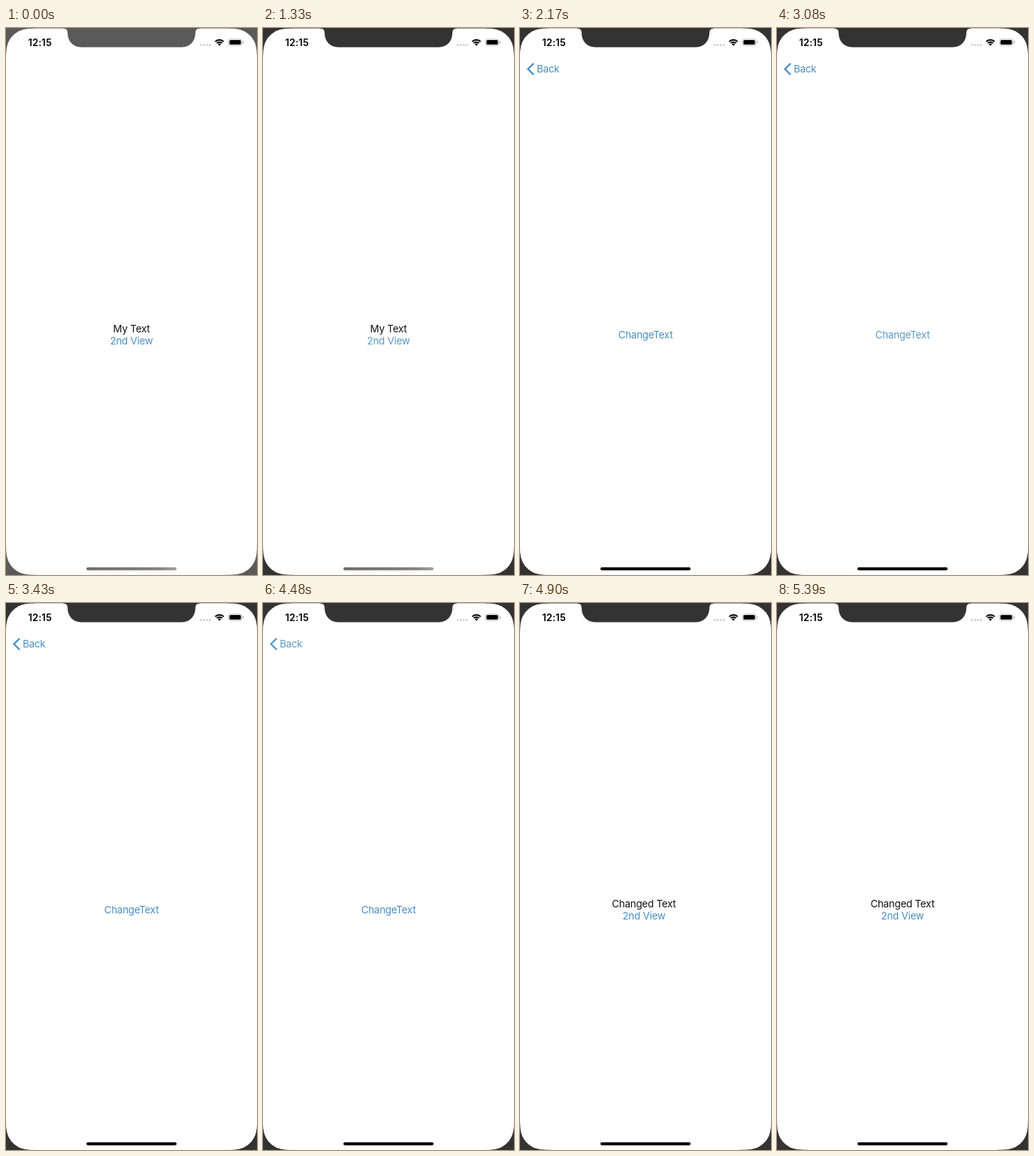
An HTML page with a canvas for the animation above (5600 ms loop, 334x726 px).

```html
<!DOCTYPE html>
<html lang="en">
<head>
<meta charset="utf-8">
<title>Navigation demo</title>
<style>
  html, body { margin: 0; width: 100%; height: 100%; overflow: hidden; background: #333; }
  canvas { display: block; width: 334px; height: 726px; }
</style>
</head>
<body>
<canvas id="stage"></canvas>
<script>
const W = 334, H = 726, LOOP = 5600, STEP = 70;
const TINT = '#4a8ebf', INK = '#111';
const PUSH_AT = 1442, POP_AT = 4568, TAP_AT = 3080, SPRING = 0.0174;

const canvas = document.getElementById('stage');
const ctx = canvas.getContext('2d');
const dpr = window.devicePixelRatio || 1;
canvas.width = W * dpr;
canvas.height = H * dpr;

const clamp = v => Math.max(0, Math.min(1, v));
const fadeIn = p => clamp((p - 0.4) / 0.45);

// Critically damped spring from 0 to 1
function spring(ms) {
  const x = Math.max(0, ms) * SPRING;
  return x > 9.2 ? 1 : 1 - (1 + x) * Math.exp(-x);
}

// Opacity dip of a pressed button
function press(t, at) {
  const u = (t - at + 50) / 400;
  return t < at || u >= 1 ? 1 : 1 - 0.65 * Math.sin(Math.PI * u) ** 2;
}

function text(str, x, y, color, align = 'center', font = '400 13.3px', spacing = -0.2) {
  ctx.font = font + ' Inter, "Liberation Sans", sans-serif';
  ctx.letterSpacing = spacing + 'px';
  ctx.textAlign = align;
  ctx.fillStyle = color;
  ctx.fillText(str, x, y);
}

function pill(x, y, w, h, r, color) {
  ctx.beginPath();
  ctx.roundRect(x, y, w, h, r);
  ctx.fillStyle = color;
  ctx.fill();
}

// Rounded screen outline with continuous-curvature corners
function screenPath(r) {
  const top = 0.6;
  const corner = (x, y, sx, sy, flip) => {
    const at = (a, b) => flip ? [x + sx * b * r, y + sy * a * r] : [x + sx * a * r, y + sy * b * r];
    ctx.lineTo(...at(1.529, 0));
    ctx.bezierCurveTo(...at(1.088, 0), ...at(0.868, 0), ...at(0.631, 0.075));
    ctx.bezierCurveTo(...at(0.373, 0.169), ...at(0.169, 0.373), ...at(0.075, 0.631));
    ctx.bezierCurveTo(...at(0, 0.868), ...at(0, 1.088), ...at(0, 1.529));
  };
  ctx.beginPath();
  corner(0, top, 1, 1, false);
  corner(0, H, 1, -1, true);
  corner(W, H, -1, -1, false);
  corner(W, top, -1, 1, true);
  ctx.closePath();
}

function rootView(t, p) {
  const x = W / 2 - 0.3 * W * p;
  text(t < TAP_AT ? 'My Text' : 'Changed Text', x, 404, INK);
  ctx.globalAlpha = press(t, 1330);
  text('2nd View', x, 420, TINT);
  ctx.globalAlpha = 1;
  ctx.fillStyle = `rgba(0,0,0,${0.064 * fadeIn(p)})`;
  ctx.fillRect(0, 0, W, H);
}

function detailView(t, p) {
  const x = W * (1 - p);
  ctx.fillStyle = '#fff';
  ctx.fillRect(x, 0, W, H);
  ctx.globalAlpha = press(t, TAP_AT);
  text('ChangeText', x + W / 2, 412, TINT);
  ctx.globalAlpha = 1;
}

// The label shrinks from large-title size into the bar
function backButton(t, p) {
  const r = 1 - p, dim = press(t, 4480);
  ctx.save();
  ctx.translate(22.2 - 10 * r, 54.5 + 43 * r);
  ctx.save();
  ctx.scale(1 + r, 1 + r);
  ctx.globalAlpha = dim * fadeIn(p);
  text('Back', 0, 4.8, TINT, 'left');
  ctx.restore();
  ctx.translate(80 * r, 0);
  ctx.globalAlpha = dim * clamp((p - 0.89) / 0.11);
  ctx.beginPath();
  ctx.moveTo(-4, -7.5);
  ctx.lineTo(-11.6, 0);
  ctx.lineTo(-4, 7.5);
  ctx.strokeStyle = TINT;
  ctx.lineWidth = 2.3;
  ctx.stroke();
  ctx.restore();
}

function wifi(x, y) {
  const a = Math.PI * 1.25, b = Math.PI * 1.75;
  ctx.strokeStyle = ctx.fillStyle = '#000';
  ctx.lineWidth = 1.9;
  for (const r of [8, 5.1]) {
    ctx.beginPath();
    ctx.arc(x, y, r, a, b);
    ctx.stroke();
  }
  ctx.beginPath();
  ctx.moveTo(x, y);
  ctx.arc(x, y, 3.1, a, b);
  ctx.fill();
}

function statusBar() {
  text('12:15', 45.2, 24, '#000', 'center', '600 12.9px', 0.1);
  for (let i = 0; i < 4; i++) pill(258 + i * 4, 21.2, 2.5, 2.5, 1.25, '#c6c6c6');
  wifi(284, 23.8);
  ctx.beginPath();
  ctx.roundRect(296.1, 14.9, 17.8, 8.4, 2.6);
  ctx.strokeStyle = '#a6a6a6';
  ctx.lineWidth = 0.8;
  ctx.stroke();
  pill(297.4, 16.1, 15.2, 6, 1.5, '#000');
  pill(315.1, 17.6, 1.1, 3, 0.6, '#a6a6a6');
}

function notch(color) {
  const bottom = 25.4;
  ctx.beginPath();
  ctx.moveTo(76, 0);
  ctx.lineTo(76, 0.6);
  ctx.quadraticCurveTo(82, 0.8, 82, 6.5);
  ctx.bezierCurveTo(82, 17.5, 89, bottom, 100, bottom);
  ctx.lineTo(234, bottom);
  ctx.bezierCurveTo(245, bottom, 252, 17.5, 252, 6.5);
  ctx.quadraticCurveTo(252, 0.8, 258, 0.6);
  ctx.lineTo(258, 0);
  ctx.fillStyle = color;
  ctx.fill();
}

function homeBar(t) {
  let color = '#000';
  if (t < 1400) {
    color = ctx.createLinearGradient(107, 0, 227, 0);
    color.addColorStop(0, '#6c6c6c');
    color.addColorStop(0.8, '#828282');
    color.addColorStop(1, '#a0a0a0');
  }
  pill(107, 715.8, 120, 4, 2, color);
}

function draw(t) {
  const bezel = t < 1330 ? '#5a5a5a' : '#333';
  const p = t < POP_AT ? spring(t - PUSH_AT) : 1 - spring(t - POP_AT);
  ctx.setTransform(dpr, 0, 0, dpr, 0, 0);
  ctx.fillStyle = bezel;
  ctx.fillRect(0, 0, W, H);

  ctx.save();
  screenPath(31.9);
  ctx.clip();
  ctx.fillStyle = '#fff';
  ctx.fillRect(0, 0, W, H);
  rootView(t, p);
  if (p > 0) {
    detailView(t, p);
    backButton(t, p);
  }
  statusBar();
  homeBar(t);
  ctx.restore();
  notch(bezel);
}

const start = performance.now();
function tick() {
  const t = (performance.now() - start) % LOOP;
  draw(Math.floor(t / STEP) * STEP);
  requestAnimationFrame(tick);
}
tick();
</script>
</body>
</html>
```
